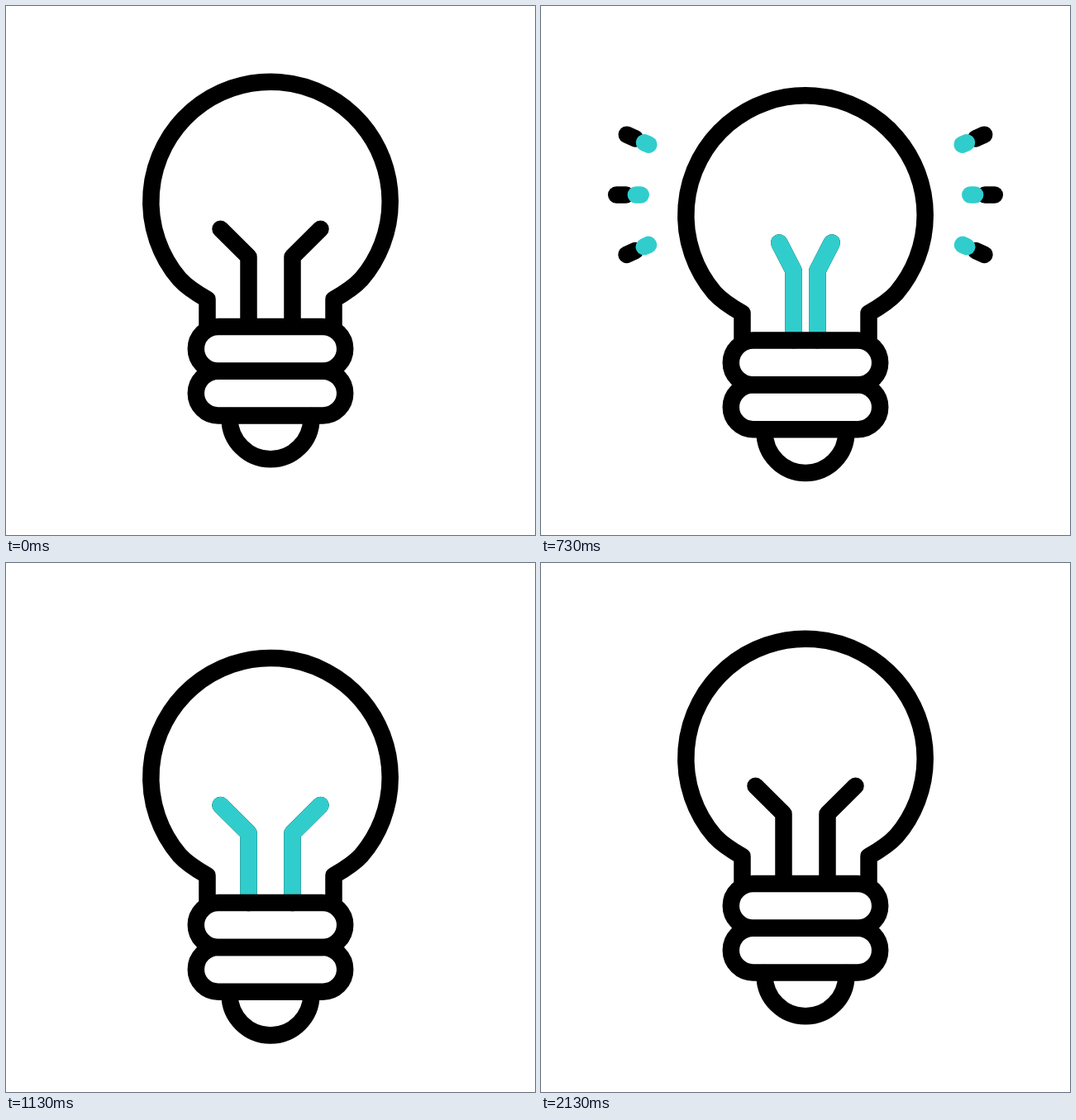
Recreate the animation shown at these times as an HTML page with a canvas. Size 640x640 px, loop 2.5 s.

```html
<!DOCTYPE html>
<html lang="en">
<head>
<meta charset="utf-8">
<title>Light bulb</title>
<style>
html, body { margin: 0; width: 100%; height: 100%; overflow: hidden; background: #fff; }
canvas { display: block; width: 640px; height: 640px; }
</style>
</head>
<body>
<canvas id="stage" width="640" height="640"></canvas>
<script>
const ctx = document.getElementById('stage').getContext('2d');
const LOOP = 2500, STEP = 1000 / 30;
const BLACK = '#000', TEAL = '#31cdcd';

// Keys are [frame, value] pairs, eased in and out between neighbours.
const bounce = [[11.25, 0], [20.25, 23.2], [25.25, 0], [34.1, 23.2], [39, 0]];
const squeeze = [[9.75, 0], [20.25, 1], [25.25, 0]];
const glow = [[9, 0], [21, 1], [52, 1], [64, 0]];

// Rays on the right-hand side: inner end, outer end.
const rays = [
  [[509.7, 151], [536.3, 139]],
  [[519.3, 211.8], [548.8, 211.8]],
  [[510, 272.2], [536.5, 284.2]]
];

const smooth = x => {
  const c = Math.min(1, Math.max(0, x));
  return c * c * (3 - 2 * c);
};
const ramp = (frame, start, length) => smooth((frame - start) / length);

function valueAt(keys, frame) {
  let value = keys[0][1];
  for (let i = 1; i < keys.length; i++) {
    const [start, from] = keys[i - 1], [end, to] = keys[i];
    if (frame >= start) value = from + (to - from) * ramp(frame, start, end - start);
  }
  return value;
}

// Part of a polyline between two fractions of its length.
function trim(points, from, to) {
  const lengths = points.slice(1).map((p, i) => Math.hypot(p[0] - points[i][0], p[1] - points[i][1]));
  const total = lengths.reduce((a, b) => a + b, 0);
  const at = (i, d) => {
    const [a, b] = [points[i], points[i + 1]], q = d / lengths[i];
    return [a[0] + (b[0] - a[0]) * q, a[1] + (b[1] - a[1]) * q];
  };
  const result = [];
  let done = 0;
  lengths.forEach((len, i) => {
    const a = Math.max(0, from * total - done), b = Math.min(len, to * total - done);
    if (a < b) {
      if (!result.length) result.push(at(i, a));
      result.push(at(i, b));
    }
    done += len;
  });
  return result;
}

function line(points, color, from = 0, to = 1) {
  if (to - from < 1e-4) return;
  ctx.strokeStyle = color;
  ctx.beginPath();
  trim(points, from, to).forEach(([x, y]) => ctx.lineTo(x, y));
  ctx.stroke();
}

const mirror = points => points.map(([x, y]) => [640 - x, y]);

function bothSides(points, color, from, to) {
  line(points, color, from, to);
  line(mirror(points), color, from, to);
}

function drawRays(frame, start, color) {
  const to = ramp(frame, start, 7), from = ramp(frame, start + 4, 7);
  rays.forEach(ray => bothSides(ray, color, from, to));
}

function drawBulb() {
  ctx.strokeStyle = BLACK;
  ctx.beginPath();
  ctx.moveTo(243.5, 388);
  ctx.lineTo(243.5, 355);
  ctx.quadraticCurveTo(220, 341.5, 210, 330.4);
  const angle = Math.atan2(94, 110);
  ctx.arc(320, 236.4, 144.7, Math.PI - angle, angle);
  ctx.quadraticCurveTo(420, 341.5, 396.5, 355);
  ctx.lineTo(396.5, 388);
  ctx.stroke();

  ctx.beginPath();
  ctx.moveTo(270.6, 496);
  ctx.arc(320, 498.9, 49.4, Math.PI, 0, true);
  ctx.lineTo(369.4, 496);
  ctx.stroke();

  for (const y of [387.9, 441.7]) {
    ctx.beginPath();
    ctx.roundRect(229.8, y, 180.4, 53.8, 26.9);
    ctx.stroke();
  }
}

function draw(frame) {
  ctx.setTransform(1, 0, 0, 1, 0, 0);
  ctx.fillStyle = '#fff';
  ctx.fillRect(0, 0, 640, 640);
  ctx.lineWidth = 20.5;
  ctx.lineCap = ctx.lineJoin = 'round';
  ctx.translate(0, valueAt(bounce, frame));

  drawRays(frame, 14, BLACK);
  drawRays(frame, 20, TEAL);

  const s = valueAt(squeeze, frame);
  const joint = 293.5 + 16.8 * s;
  const filament = [[joint, 387.7], [joint, 303.6], [259.5 + 40 * s, 269.8]];
  bothSides(filament, BLACK);
  bothSides(filament, TEAL, 0, valueAt(glow, frame));

  drawBulb();
}

// Frames run at 30 per second, with starts rounded to 10 ms.
function frameAt(time) {
  const frame = Math.floor((time + 4) / STEP);
  return Math.round(frame * STEP / 10) * 10 > time ? frame - 1 : frame;
}

const origin = performance.now();
function tick() {
  draw(frameAt((performance.now() - origin) % LOOP));
  requestAnimationFrame(tick);
}
tick();
</script>
</body>
</html>
```
